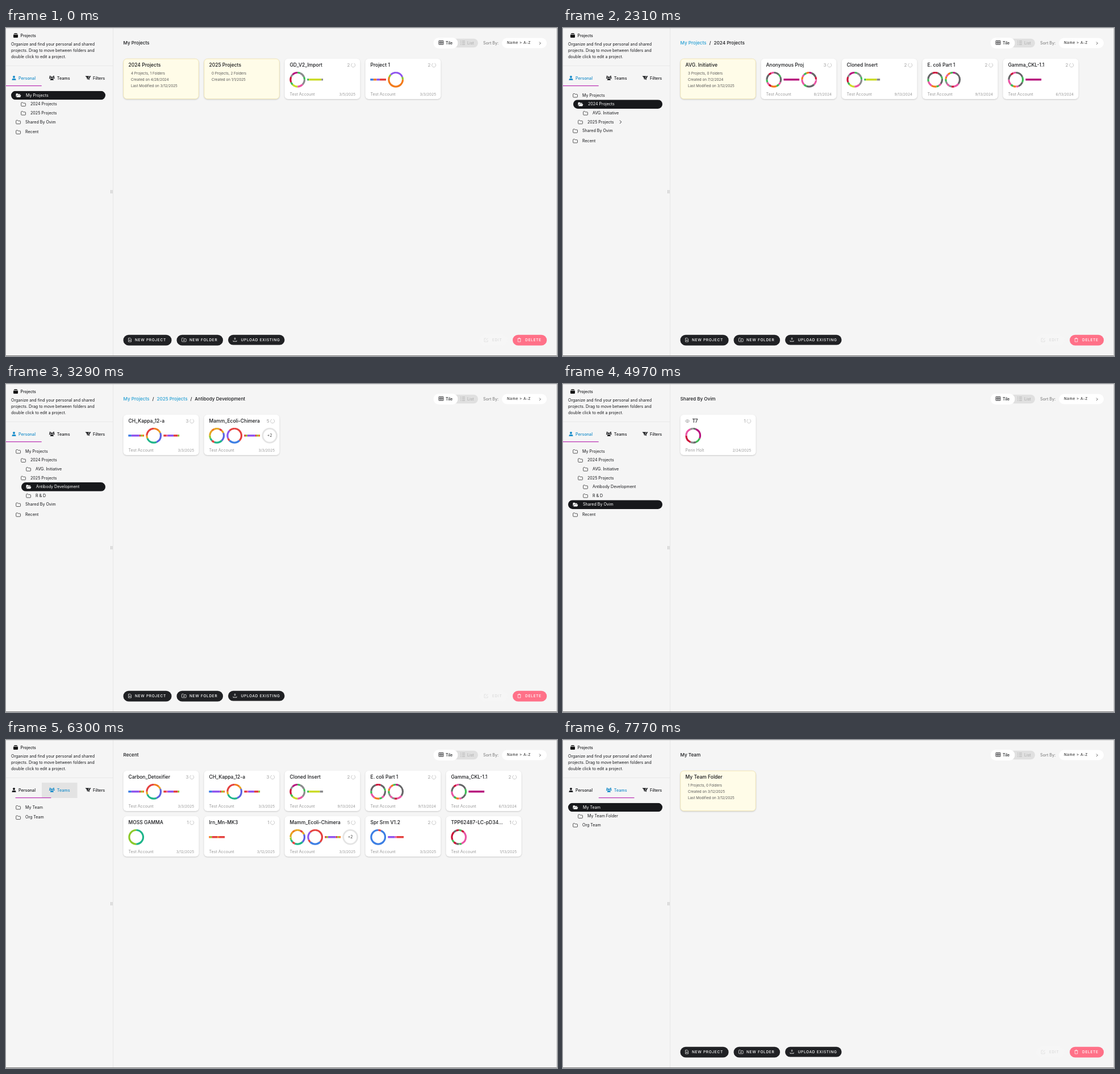
Animation of 970x577 px, one loop 8000 ms. Source, as an HTML page:

```html
<!DOCTYPE html>
<html lang="en">
<head>
<meta charset="utf-8">
<title>Projects</title>
<style>
  html, body { margin: 0; width: 100%; height: 100%; overflow: hidden; background: #f5f5f5; }
  svg { display: block; }
  text { font-family: Inter, sans-serif; white-space: pre; }
  .card { filter: drop-shadow(0 1px 1.2px rgba(0, 0, 0, .18)); }
</style>
</head>
<body>
<svg id="stage" width="970" height="577" viewBox="0 0 970 577"></svg>
<script>
const stage = document.getElementById('stage');
const LOOP = 8000, ROW = 15.6;
const INK = '#17181b', BLUE = '#168bc9', GREY = '#999';

const palette = {
  k: '#666668', s: '#8b8b8d', g: '#3dbb55', p: '#ea55a5', m: '#b8147f', r: '#cb1238',
  o: '#f27a1a', y: '#cbdc28', b: '#3d7fe4', v: '#8f55ee', t: '#1fb58a', e: '#e4413f',
  a: '#e5a520', l: '#8cc92a', d: '#5b62e2'
};

// Cards: name, count, date, then constructs (R = ring, L = line, + = more)
const cloned = 'Rgssgssppyygrrsmm', kappa = ['Lbbvvvvvelo', 'Rooaddddttttaeeee', 'Leepvvvveeel'];
const ecoli = ['E. coli Part 1', 2, '9/13/2024', 'Rrkkgkkpgooppgkkkr', 'Rmkkkkkpprspsgopog'];
const gamma = ['Gamma_CKL-1.1', 2, '6/13/2024', 'Rkkkggkkpogppkkrp', 'Lm'];
const insert = ['Cloned Insert', 2, '9/13/2024', cloned, 'Lgyyyyyyyss'];
const chKappa = ['CH_Kappa_12-a', 3, '3/3/2025', ...kappa];
const chimera = ['Mamm_Ecoli-Chimera', 5, '3/3/2025', 'Raeadddtttetlaaoa', 'Reeeeeebbbbevvvee', 'Lelvvvvvelo', '+2'];

const folder = (name, ...lines) => ({ name, lines });
const scenes = [
  { at: 0, path: ['My Projects'], buttons: 1, cards: [
    folder('2024 Projects', '4 Projects, 1 Folders', 'Created on 4/28/2024', 'Last Modified on 3/12/2025'),
    folder('2025 Projects', '0 Projects, 2 Folders', 'Created on 1/1/2025'),
    ['GD_V2_Import', 2, '3/5/2025', cloned, 'Lgyyyyyyyys'],
    ['Project 1', 2, '3/3/2025', 'Lbboovveeee', 'Rvvvlooooooooolvv']] },
  { at: 1680, path: ['My Projects', '2024 Projects'], buttons: 1, cards: [
    folder('AVG. Initiative', '3 Projects, 0 Folders', 'Created on 7/2/2024', 'Last Modified on 3/12/2025'),
    ['Anonymous Proj', 3, '8/21/2024', 'Rkkgkkpgoorpgkkrp', 'Lm', 'Rmkkrppkkkgppopgo'],
    insert, ecoli, gamma] },
  { at: 2520, path: ['My Projects', '2025 Projects'], buttons: 1, cards: [
    folder('Antibody Development', '2 Projects, 0 Folders', 'Created on 3/3/2025'),
    folder('R &amp; D', '0 Projects, 0 Folders', 'Created on 3/3/2025')] },
  { at: 3290, path: ['My Projects', '2025 Projects', 'Antibody Development'], buttons: 1, cards: [chKappa, chimera] },
  { at: 3990, path: ['Shared By Ovim'], cards: [
    { owner: 'Perin Holt', data: ['T7', 1, '2/24/2025', 'Rkmmmmggksrrrppps'] }] },
  { at: 5040, path: ['Recent'], cards: [
    ['Carbon_Detoxifier', 3, '3/3/2025', ...kappa], chKappa, insert, ecoli, gamma,
    ['MOSS GAMMA', 1, '3/12/2025', 'Rttttttttllllllll'],
    ['Irn_Mn-MK3', 1, '3/12/2025', 'Loleeeeoeeee'],
    chimera,
    ['Spr Srm V1.2', 2, '3/3/2025', 'Rebbbbbbbbbbbbbbb', 'Lvvvvpeeee'],
    ['TPP62487-LC-pD34...', 1, '1/13/2025', 'Rgrpppppgkrgrrrkr']] },
  { at: 7280, path: ['My Team'], buttons: 1, cards: [
    folder('My Team Folder', '1 Projects, 0 Folders', 'Created on 3/12/2025', 'Last Modified on 3/12/2025')] }
];

// Tree row under the pointer, from the given time on
const hovers = [[0, ''], [1260, '2025 Projects'], [1400, '2024 Projects'], [2240, '2025 Projects'], [3290, ''],
  [5390, '2025 Projects'], [5530, ''], [6930, 'My Team'], [7700, '']];

const clamp = u => Math.max(0, Math.min(1, u));
const grow = (t, start) => {
  if (t < start) return 0;
  const u = clamp((t - start + 30) / 300);
  return u * u * (3 - 2 * u);
};
const text = (x, y, str, size, fill = INK, more = '') =>
  `<text x="${x}" y="${y}" font-size="${size}" fill="${fill}" ${more}>${str}</text>`;
const rect = (x, y, w, h, fill, r = 0, more = '') =>
  `<rect x="${x}" y="${y}" width="${w}" height="${h}" rx="${r}" fill="${fill}" ${more}/>`;
const line = (x, y, d, color, width = .8) =>
  `<path transform="translate(${x} ${y})" d="${d}" fill="none" stroke="${color}" stroke-width="${width}" stroke-linejoin="round"/>`;
const solid = (x, y, d, color) => `<path transform="translate(${x} ${y})" d="${d}" fill="${color}"/>`;
const disc = (x, y, r) => `M${x - r} ${y}a${r} ${r} 0 0 1 ${2 * r} 0a${r} ${r} 0 0 1 ${-2 * r} 0z`;
const MEDIUM = 'font-weight="500"', SPACED = 'font-weight="500" letter-spacing=".7"';

const FOLDER = 'M.4 1.4q0-1 1-1h1.8l1 1.1h3q1 0 1 1v3.3q0 1-1 1H1.4q-1 0-1-1z';
const FOLDER_OPEN = 'M0 5.8V1.2Q0 .2 1 .2h2l1 1h2.6q1 0 1 1v.6H2.2L.6 6zM2.6 3.3H9L7.6 6.8H.8z';
const RIGHT = 'M-1.4-2.8 1.4 0-1.4 2.8', DOWN = 'M-2.8-1.4 0 1.4 2.8-1.4';
const PERSON = disc(4, 2, 2) + 'M.5 7.8V7Q.5 4.8 2.7 4.8h2.6Q7.5 4.8 7.5 7v.8z';
const TEAM = disc(5, 2.8, 1.6) + disc(1.9, 1.2, 1.2) + disc(8.1, 1.2, 1.2) +
  'M2 7.8Q2 4.9 4 4.9h2Q8 4.9 8 7.8zM0 4.8Q0 2.8 1.4 2.8h1.3Q2.7 4 3.4 4.8zM10 4.8Q10 2.8 8.6 2.8H7.3Q7.3 4 6.6 4.8z';
const FILTER = 'M0 .5h7L4.9 3.6V7L3 5.5V3.6zM7.7.5H10L7.3 4.5v3L5.6 6.2V4z';
const FILE = 'M.5.5H4l1.5 1.6V7h-5zM3 3v2.6M1.7 4.3h2.6';
const STACK = 'M1.5 0h5v.8h-5zM.8 1.3h6.4v.8H.8zM0 2.7h8V7Q8 8 7 8H1Q0 8 0 7z';
const EYE = 'M-4 0Q0-5 4 0Q0 5-4 0' + disc(0, 0, 1.4);
const GRID = 'M0 0h8v6.5H0zM0 3.2h8M2.7 0v6.5M5.3 0v6.5';
const LIST = 'M0 0h1.5M3 0h5M0 3h1.5M3 3h5M0 6h1.5M3 6h5';
const UPLOAD = 'M.5 4.5v2h6v-2M3.5 4.5V0M2 1.500 3.5 0 5 1.5';
const PENCIL = 'M4 1H.5v6h6V4M3 4.500 7 .5';
const BIN = 'M0 1.5h6M2 1.5V.3h2v1.2M.7 1.5V7h4.600V1.5';

function construct(code, x, y) {
  const cx = x + 13.9;
  if (code[0] === '+')
    return `<circle cx="${cx}" cy="${y}" r="12.4" fill="none" stroke="#e4e4e4" stroke-width="2.8"/>` +
      text(cx, y + 2.4, code, 7, '#444', 'text-anchor="middle"');
  const seq = code.slice(1), n = seq.length;
  return [...seq.matchAll(/(.)\1*/g)].map(({ 0: run, index }) => {
    const color = palette[run[0]];
    return code[0] === 'L'
      ? rect(x + index * 27.8 / n, y - 1.7, run.length * 27.8 / n, 3.4, color, .5)
      : `<circle cx="${cx}" cy="${y}" r="12.3" fill="none" stroke="${color}" stroke-width="3.2" pathLength="${n}"
          stroke-dasharray="${run.length} ${n - run.length}" stroke-dashoffset="${-index}" transform="rotate(-90 ${cx} ${y})"/>`;
  }).join('');
}

function card(item, i) {
  const x = 206.5 + i % 5 * 142, y = 54 + Math.floor(i / 5) * 80;
  if (item.lines)
    return rect(x + .3, y + .3, 132.4, 70.4, '#fffce8', 6, 'class="card" stroke="#f3e3a6" stroke-width=".7"') +
      text(x + 9, y + 13.5, item.name, 8.5, INK, MEDIUM) +
      item.lines.map((s, k) => text(x + 13.5, y + 28.4 + k * 11, s, 6.3, '#555')).join('');
  const { owner, data = item } = item;
  const [name, count, date, ...parts] = data;
  return rect(x, y, 133, 71, '#fff', 6, 'class="card"') +
    (owner ? line(x + 12.5, y + 11.2, EYE, GREY, .7) : '') +
    text(x + (owner ? 21 : 9), y + 13.8, name, 8.5, INK, MEDIUM) +
    text(x + 115, y + 14, count, 8, '#a0a0a0', 'text-anchor="end"') +
    line(x + 120.7, y + 11.4, 'M1.2-3.3A3.5 3.5 0 1 1-1.2-3.3', '#bbb') +
    parts.map((code, k) => construct(code, x + 8.8 + 31 * k, y + 36.8)).join('') +
    text(x + 9, y + 65, owner || 'Test Account', 7.1, GREY) +
    text(x + 124.5, y + 64.8, date, 6.5, GREY, 'text-anchor="end"');
}

function treeRow(label, depth, selected, hovered, expanded) {
  const x = 9 * depth, y = ROW / 2, color = selected ? '#fff' : INK;
  const chevronX = (label === 'My Team' ? 77.5 : 101.3) + (expanded ? .7 : 0);
  return (selected ? rect(x + 9, 0, 166 - x, ROW, INK, y) : '') +
    (selected ? solid(x + 17.5, y - 3.5, FOLDER_OPEN, color) : line(x + 17.3, y - 3.4, FOLDER, '#333')) +
    text(x + (selected ? 35 : 34), y + 2.2, label, 7.1, color) +
    (hovered ? line(chevronX, y, expanded ? DOWN : RIGHT, color, .9) : '');
}

// Each row sits in its own box, so unfolding rows are cut off by its height
function tree(t, selected) {
  const hover = hovers.findLast(h => h[0] <= t)[1];
  const group = (label, open, names, depth) => [[label, depth, 1, open], ...names.map(n => [n, depth + 1, open, 0])];
  const roots = t < 6230
    ? [[['My Projects', 0, 1, 1], ...group('2024 Projects', grow(t, 1680), ['AVG. Initiative'], 1),
        ...group('2025 Projects', grow(t, 2520), ['Antibody Development', 'R &amp; D'], 1)],
      [['Shared By Ovim', 0, 1, 0]], [['Recent', 0, 1, 0]]]
    : [group('My Team', grow(t, 7280), ['My Team Folder'], 0), [['Org Team', 0, 1, 0]]];
  let top = 110.7, out = '';
  for (const rows of roots) {
    let y = top;
    for (const [label, depth, shown, expanded] of rows) {
      if (!shown) continue;
      const body = treeRow(label, depth, label === selected, label === hover, expanded > 0);
      out += `<svg y="${y}" width="188" height="${ROW * shown}">${body}</svg>`;
      y += ROW * shown;
    }
    top += Math.max(17.7, y - top);
  }
  return out;
}

function sidebar(t, selected) {
  const teams = t >= 6230, hover = t < 6720 ? clamp((t - 5500) / 100) : 0;
  const tab = (x, label, active) => text(x, 90.7, label, 7.2, active ? BLUE : INK, MEDIUM);
  return solid(13, 9, STACK, '#111') + text(25.5, 15.7, 'Projects', 7, INK, MEDIUM) +
    ['Organize and find your personal and shared', 'projects. Drag to move between folders and', 'double click to edit a project.']
      .map((s, i) => text(9, 31.3 + 11 * i, s, 7.1)).join('') +
    rect(0, 66, 188, .8, '#e7e7e7') + rect(188, 0, .8, 577, '#e4e4e4') +
    rect(184.3, 285, .8, 6, '#b5b5b5') + rect(186.5, 285, .8, 6, '#b5b5b5') +
    (hover ? rect(63, 75, 62.5, 27, '#e3e3e3', 0, `opacity="${hover}"`) : '') +
    solid(10, 84, PERSON, teams ? INK : BLUE) + tab(22, 'Personal', !teams) +
    solid(75.8, 84, TEAM, teams ? BLUE : INK) + tab(89.8, 'Teams', teams) +
    solid(139.5, 84, FILTER, INK) + tab(153, 'Filters') +
    rect(62.8 * grow(t, 6230), 101, 62.7, 1.2, '#b92fb2') +
    tree(t, selected);
}

function toolbar() {
  return rect(775, 18.8, 56, 15.4, '#e0e0e0', 7.7) + rect(752.5, 17, 43, 19, '#fff', 9.5) +
    line(762, 22.5, GRID, INK) + text(774, 28.5, 'Tile', 7, INK, MEDIUM) +
    line(800, 23, LIST, '#b0b0b0', 1) + text(812, 28.5, 'List', 7, '#a8a8a8') +
    text(840, 28.5, 'Sort By:', 7.2, '#888', MEDIUM) +
    rect(873, 17.5, 79, 18, '#fff', 9) +
    text(882, 28.4, 'Name &gt; A-Z', 6.2, '#333', 'font-weight="500" letter-spacing=".6"') +
    line(940, 26.8, 'M-1-2.2 1.2 0-1 2.2', '#333');
}

function buttons() {
  const button = (x, w, h, fill, tx, label, icon, color = '#fff') =>
    rect(x, 539.8, w, h, fill, h / 2) + line(x + 8.5, 545, icon, color, .7) + text(tx, 541.7 + h / 2, label, 6.5, color, SPACED);
  return button(206.5, 85, 18.7, '#202124', 227, 'NEW PROJECT', FILE) +
    button(300.5, 81.5, 18.7, '#202124', 323, 'NEW FOLDER', FOLDER + 'M4.3 2.7v2.8M2.9 4.1h2.8') +
    button(391, 99.5, 17.7, '#202124', 413.5, 'UPLOAD EXISTING', UPLOAD) +
    button(833, 50, 18.7, '#f6f6f6', 856, 'EDIT', PENCIL, '#dadada') +
    button(892, 60, 18.7, '#ff7188', 914, 'DELETE', BIN);
}

function draw(t) {
  const { path, cards, buttons: hasButtons } = scenes.findLast(s => s.at <= t);
  const crumbs = path.map((name, i) => {
    const last = i === path.length - 1;
    return `<tspan ${i ? 'dx="5"' : ''} fill="${last ? INK : '#249fd4'}">${name}</tspan>` + (last ? '' : '<tspan dx="5">/</tspan>');
  }).join('');
  return rect(0, 0, 970, 577, '#f5f5f5') + sidebar(t, path.at(-1)) +
    text(206.5, 28.8, crumbs, 8.15, INK, MEDIUM) + toolbar() +
    cards.map(card).join('') + (hasButtons ? buttons() : '') +
    rect(0, 0, 970, .6, '#ccc') + rect(0, 576, 970, 1, '#777') + rect(969.3, 0, .7, 577, '#bbb');
}

let shown = '';
function frame() {
  const next = draw(performance.now() % LOOP);
  if (next !== shown) stage.innerHTML = shown = next;
  requestAnimationFrame(frame);
}
frame();
</script>
</body>
</html>
```
